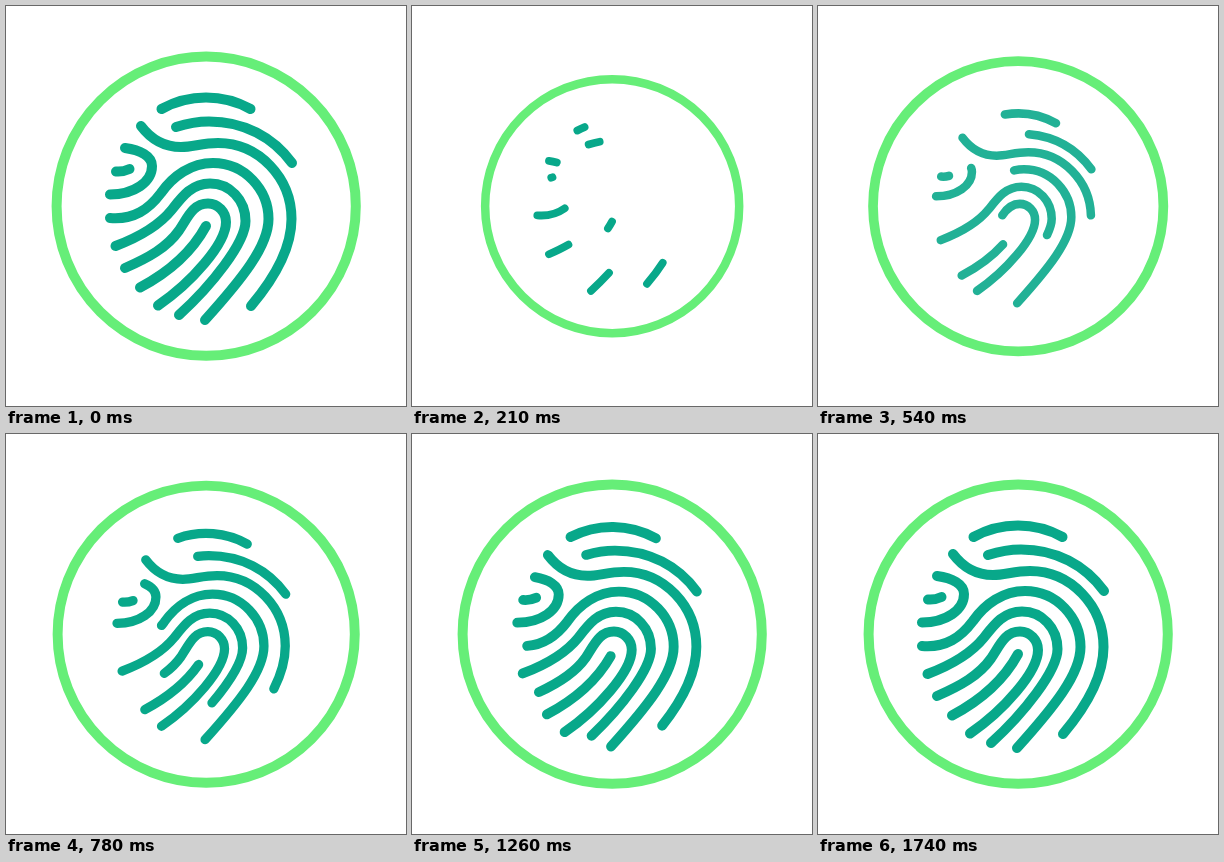
Write an HTML page that moves like this. It is 400 by 400 pixels and loops after 3.8 s.

```html
<!DOCTYPE html>
<html lang="en">
<head>
<meta charset="utf-8">
<title>Fingerprint</title>
<style>
  html, body { margin: 0; width: 100%; height: 100%; overflow: hidden; background: #fff; }
  svg { display: block; width: 100%; height: 100%; }
</style>
</head>
<body>
<svg viewBox="0 0 400 400" fill="none" stroke-width="10" stroke-linecap="round" stroke-linejoin="round">
  <circle id="ring" cx="200.2" cy="200.2" r="149.6" stroke="#66ee78"/>
  <g id="print" stroke="#08a88a">
    <path d="M155.5 103A92 92 0 0 1 244.5 103"/>
    <path d="M170 121C181 117.5 192 115.5 203 115.5C238 115.5 267 131 286 157"/>
    <path d="M245 300C272 268 285.5 240 285.5 213C285.5 172 253 137 212 137C196 137 187 141 175 141C156 141 144 132 135 120"/>
    <path d="M119 142C134 144 146 150 146 160C146 176 128 188.5 104 188.5"/>
    <path d="M123.5 163C119 165 115 166 110 165.5"/>
    <path d="M104 212C128 214 143 203 155 187C167 170 185 157 207 157C239 157 262.5 184 262.5 213C262.5 240 236 273 199 314"/>
    <path d="M173 309C205 280 239.5 237 239.5 215C239.5 194 224 177.5 204 177.5C186 177.5 176.5 190 166 203.5C154 218.5 136 230 109.5 240"/>
    <path d="M119 262C142 252 161 241.5 173 224.5C182 211 187 197.5 202 197.5C212 197.5 220 206 220 216C220 238 185 277 152 299.5"/>
    <path d="M200 220C187 244 167 264 134 281.5"/>
  </g>
</svg>
<script>
const LOOP = 3800, STEP = 30;
const SHRINK_END = 265, RING_END = 1080, PRINT_END = 1740;

const ring = document.getElementById('ring');
const print = document.getElementById('print');
const lines = [...print.children];
lines.forEach(line => line.setAttribute('pathLength', 1));

const clamp = v => Math.min(1, Math.max(0, v));
const span = (t, from, to) => clamp((t - from) / (to - from));
const mix = (a, b, k) => a + (b - a) * k;

function bezier(x1, y1, x2, y2) {
  const at = (a, b, s) => 3 * a * s * (1 - s) ** 2 + 3 * b * s * s * (1 - s) + s ** 3;
  return x => {
    if (x <= 0 || x >= 1) return clamp(x);
    let lo = 0, hi = 1;
    for (let i = 0; i < 30; i++) {
      const mid = (lo + hi) / 2;
      if (at(x1, x2, mid) < x) lo = mid; else hi = mid;
    }
    return at(y1, y2, lo);
  };
}
const easeInOut = bezier(.33, 0, .67, 1);
const easeOut = bezier(.05, .56, .2, 1);

function scale(el, k) {
  el.setAttribute('transform', `translate(200 200) scale(${k}) translate(-200 -200)`);
}

function trim(from, to) {
  print.setAttribute('visibility', to - from > .001 ? 'visible' : 'hidden');
  for (const line of lines) {
    line.setAttribute('stroke-dasharray', `${to - from} 2`);
    line.setAttribute('stroke-dashoffset', -from);
  }
}

function draw(t) {
  if (t < SHRINK_END) {
    // Lines retract to one end while everything shrinks.
    const k = easeInOut(t / SHRINK_END);
    scale(ring, mix(1, .83, k));
    scale(print, mix(1, .75, k));
    print.setAttribute('opacity', 1);
    trim(0, 1 - k);
  } else {
    // Lines grow back from the opposite end.
    const k = easeOut(span(t, SHRINK_END, PRINT_END));
    scale(ring, mix(.83, 1, easeOut(span(t, SHRINK_END, RING_END))));
    scale(print, mix(.56, 1, k));
    print.setAttribute('opacity', span(t, 240, 575));
    trim(1 - k, 1);
  }
}

const start = performance.now();
function tick() {
  const t = (performance.now() - start) % LOOP;
  draw(Math.floor(t / STEP) * STEP);
  requestAnimationFrame(tick);
}
tick();
</script>
</body>
</html>
```
